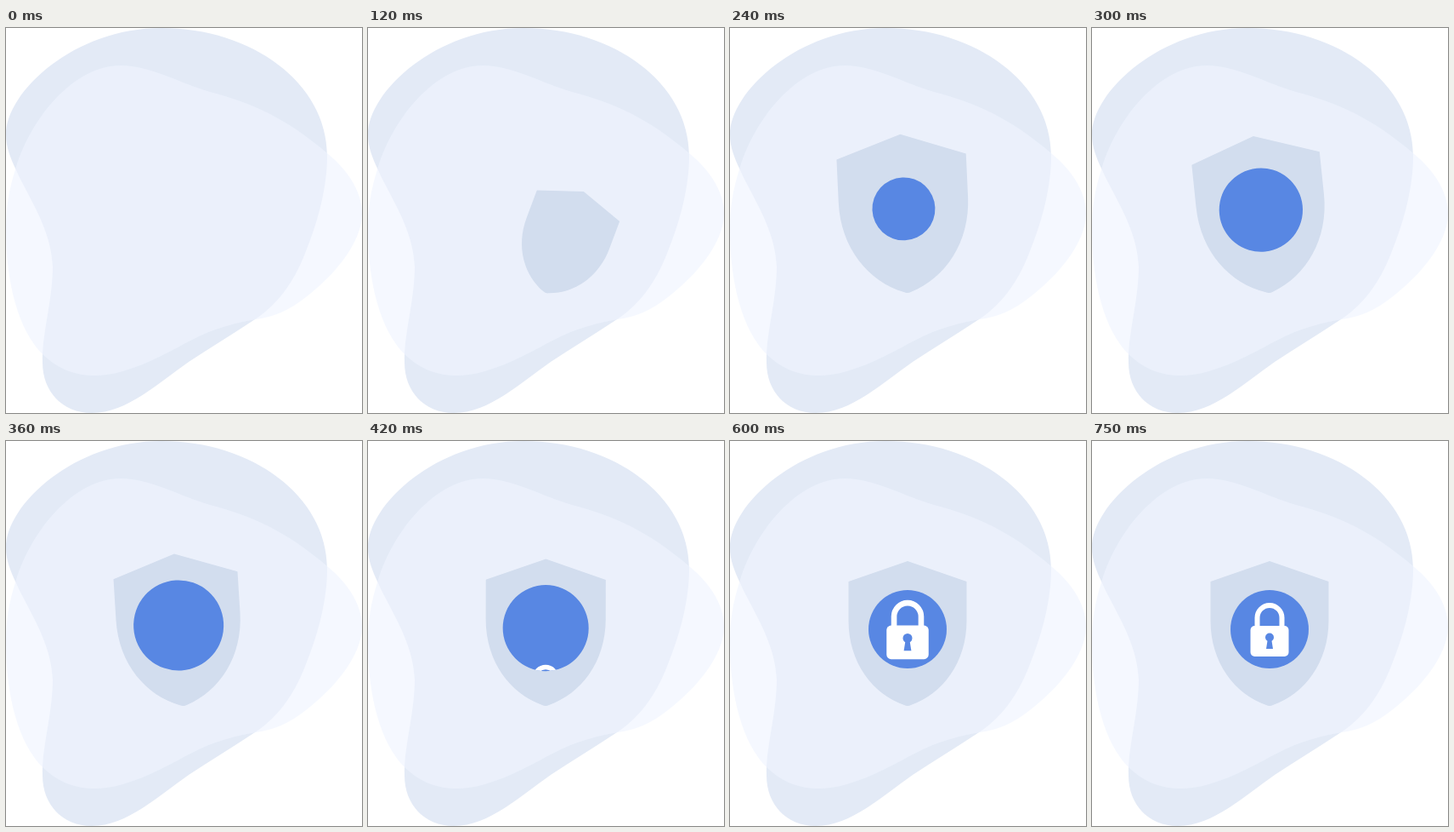
Animation, 419 px wide and 452 px high, one loop 1.65 s. Source, as an HTML page:

```html
<!DOCTYPE html>
<html lang="en">
<head>
<meta charset="utf-8">
<title>Secure shield</title>
<style>
html, body { margin: 0; width: 100%; height: 100%; overflow: hidden; background: #fff; }
svg { display: block; width: 100%; height: 100%; }
</style>
</head>
<body>
<svg viewBox="0 0 419 452">
  <defs><clipPath id="clip"><circle id="hole" cy="-90" r="46"/></clipPath></defs>
  <path fill="#e3eaf6" d="M183 0C290 0 378 65 378 150C378 195 362 240 353 262C338 302 316 328 290 344C264 361 239 376 215 392C180 416 143 452 101 452C66 452 43 426 43 393C42 360 55 320 55 280C53 235 27 200 12 167C5 152 0 140 0 125C0 75 80 0 183 0Z"/>
  <path fill="#eff4ff" fill-opacity=".64" d="M0 238C0 205 5 185 12 163C30 105 80 44 135 44C170 44 205 65 240 75C290 88 330 106 378 147C400 165 419 190 419 218C419 250 390 285 365 306C340 328 322 337 300 341C270 346 245 352 215 368C180 387 140 408 105 408C82 408 62 401 43 383C15 355 0 300 0 238Z"/>
  <g id="shield">
    <path fill="#d2ddee" d="M0-170L69.5-146V-100C69.5-51 41-14 4-1Q0 1-4-1C-41-14-69.5-51-69.5-100V-146Z"/>
    <circle id="disc" cy="-90" r="46" fill="#5887e3"/>
    <g clip-path="url(#clip)">
      <g id="lock">
        <path fill="none" stroke="#fff" stroke-width="6" d="M-14.5-2V-14a14.5 14.5 0 0 1 29 0V-2"/>
        <rect x="-22.5" y="-4.5" width="45" height="36" rx="5" fill="#fff"/>
        <path fill="#5887e3" d="M-2 10H2L4 22.5H-4Z"/>
        <circle cy="9" r="5" fill="#5887e3"/>
      </g>
    </g>
  </g>
</svg>
<script>
const LOOP = 1650, STEP = 30;
const [shield, disc, hole, lock] = ['shield', 'disc', 'hole', 'lock'].map(id => document.getElementById(id));

const part = (t, a, b) => Math.min(1, Math.max(0, (t - a) / (b - a)));
const easeOut = x => Math.sin(x * Math.PI / 2);
const smooth = x => x * x * (3 - 2 * x);
const move = (t, a, b, by) => by * smooth(part(t, a, b));

// Grow from nothing to 110 %, then settle at 100 %
const pop = (t, start, peak, end) => 1.1 * easeOut(part(t, start, peak)) - move(t, peak, end, 0.1);

function draw(t) {
  const turn = 36.4 + move(t, 0, 290, -42.4) + move(t, 290, 480, 8) + move(t, 480, 540, -2);
  shield.setAttribute('transform', `translate(209 311) rotate(${turn}) scale(${pop(t, 0, 252, 475)})`);

  const r = 46 * pop(t, 123, 375, 540);
  disc.setAttribute('r', r);
  hole.setAttribute('r', r);

  const drop = 113 * (1 - easeOut(part(t, 360, 600)));
  const size = 0.84 + move(t, 360, 600, 0.26) + move(t, 600, 750, -0.1);
  lock.setAttribute('transform', `translate(0 ${drop - 89.5}) scale(${size})`);
}

const start = performance.now();
function tick() {
  const t = (performance.now() - start) % LOOP;
  draw(Math.floor(t / STEP) * STEP);
  requestAnimationFrame(tick);
}
tick();
</script>
</body>
</html>
```
